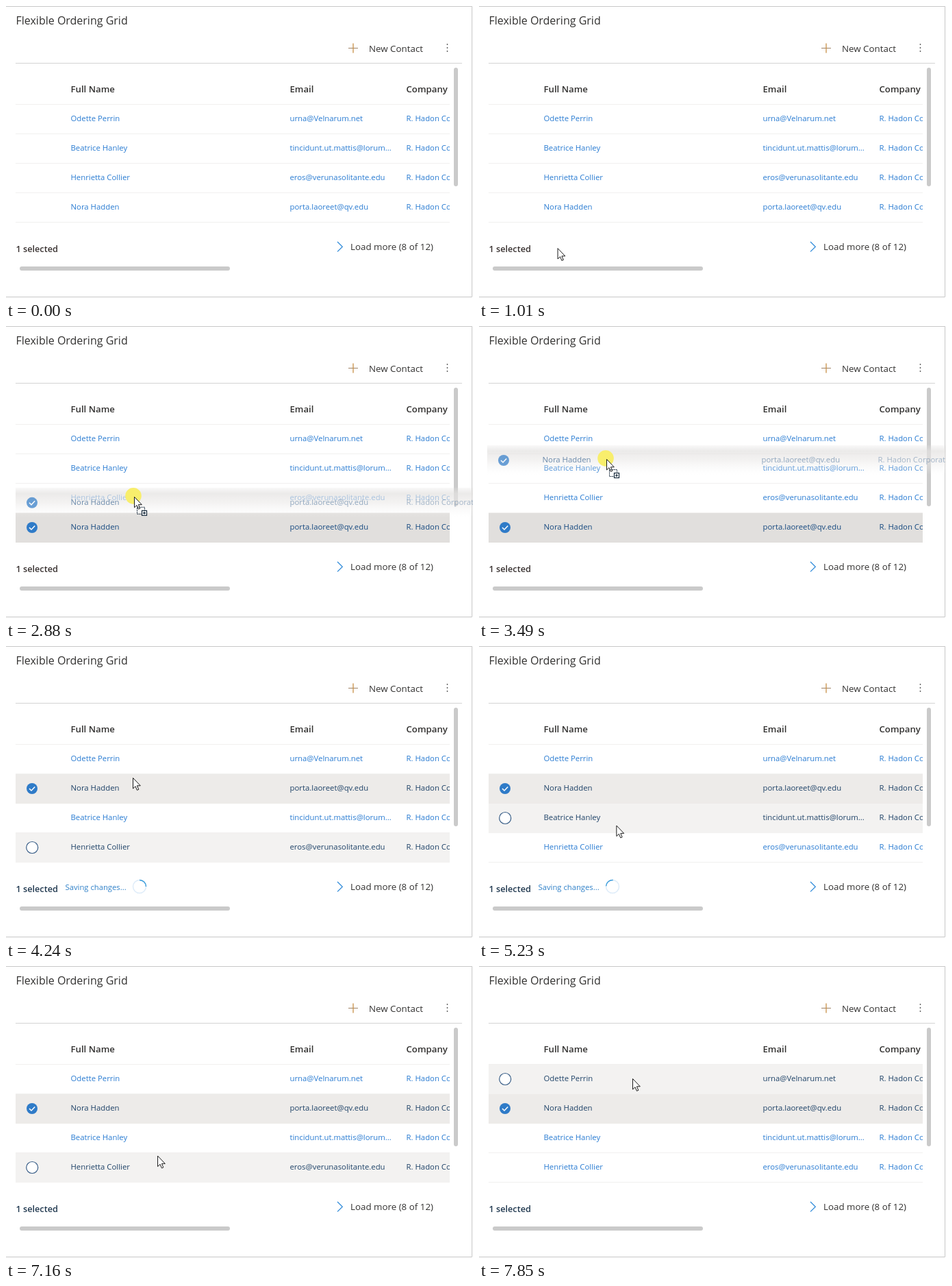
Animation, 682 px wide and 426 px high, one loop 8000 ms. Source, as an HTML page:

```html
<!DOCTYPE html>
<html lang="en">
<head>
<meta charset="utf-8">
<title>Flexible Ordering Grid</title>
<style>
  html, body { margin: 0; width: 100%; height: 100%; overflow: hidden; background: #fff; }
  svg { display: block; width: 682px; height: 426px; font-family: "Open Sans", "Noto Sans", sans-serif; }
  text { white-space: pre; }
  .cell { font-size: 11.35px; }
  .head { font-size: 13.2px; font-weight: 600; fill: #323130; }
  .body { font-size: 13.35px; fill: #323130; }
</style>
</head>
<body>
<svg id="stage" viewBox="0 0 682 426">
  <defs>
    <clipPath id="gridClip"><rect x="14" y="84" width="634" height="240"/></clipPath>
    <linearGradient id="ghostFade" x1="0" y1="0" x2="0" y2="1">
      <stop offset="0" stop-color="#e2e0df" stop-opacity=".2"/>
      <stop offset=".2" stop-color="#e4e2e1" stop-opacity=".72"/>
      <stop offset=".5" stop-color="#ebe9e8" stop-opacity=".6"/>
      <stop offset="1" stop-color="#f6f5f5" stop-opacity="0"/>
    </linearGradient>
  </defs>
  <rect width="682" height="426" fill="#fff"/>
  <path d="M0 .5H680.5V424.5H0" fill="none" stroke="#c8c8c8"/>
  <text x="14.5" y="26.5" font-size="16" fill="#323130">Flexible Ordering Grid</text>
  <path d="M500 61.5H514" stroke="#a08468"/>
  <path d="M507 54.5V68.5" stroke="#c88f45" stroke-width="1.3"/>
  <text class="body" x="530" y="66.5">New Contact</text>
  <g fill="#555">
    <circle cx="644.5" cy="56" r=".9"/><circle cx="644.5" cy="61" r=".9"/><circle cx="644.5" cy="66" r=".9"/>
  </g>
  <path d="M14 83.5H666" stroke="#d4d4d4"/>
  <g class="head">
    <text x="94.5" y="126">Full Name</text>
    <text x="414.5" y="126">Email</text>
    <text x="584.5" y="126">Company</text>
  </g>
  <path d="M14 143.5H648" stroke="#f1f0ef"/>
  <g id="rows" clip-path="url(#gridClip)"></g>
  <g fill="#cacaca">
    <rect x="654" y="90" width="6" height="173" rx="3"/>
    <rect x="20" y="380" width="307" height="6" rx="3"/>
  </g>
  <text id="count" x="14.5" y="359" font-size="12.7" font-weight="600">1 selected</text>
  <g id="saving">
    <text x="86.5" y="356" font-size="11.25" fill="#2f80c8">Saving changes...</text>
    <g fill="none" stroke-width="1.5">
      <circle cx="195" cy="351" r="9.5" stroke="#deecf9"/>
      <path id="arc" d="M195 341.5A9.5 9.5 0 0 1 204.5 351" stroke="#3c9ddb"/>
    </g>
  </g>
  <path d="M484 344L491.3 351.2L484 358.4" fill="none" stroke="#2b88d8" stroke-width="1.2"/>
  <text class="body" x="503" y="356">Load more (8 of 12)</text>
  <g id="ghost"></g>
  <g id="cursor">
    <circle id="press" cx="-1" cy="-1" r="11.8" fill="#f8ee6c"/>
    <path id="arrow" d="M.5 .5V16L4 12.7L6.4 18.3L8.8 17.3L6.4 11.8H11.3Z" fill="#fff" stroke="#1a1a1a"/>
    <g id="dragMark" fill="none" stroke="#16283a">
      <rect x="4.5" y="15.5" width="11" height="10" stroke-dasharray="2 1"/>
      <rect x="11.5" y="20.5" width="7" height="7" fill="#fff" stroke-width="1.2"/>
      <path d="M13 24H17M15 22V26" stroke-width="1.2"/>
    </g>
    <path id="hand" fill="#fff" stroke="#1a1a1a" stroke-linejoin="round"
      d="M3.7 15V2.2Q3.7.6 5.1.6T6.5 2.2V8.4Q8.9 7.4 9 9.4Q11 8.6 11.1 10.4Q13 9.8 13 12V17Q13 19.3 11.4 21V23.4H4.6V21.4L1.2 16.6Q-.2 14 .9 13.2Q2 12.6 3.7 15Z"/>
  </g>
</svg>
<script>
const LOOP = 8000, ROW_H = 43, TOP = 143;
const PRESS = 2380, DRAG = 2590, RELEASE = 3820, REORDER = 3890, MOVE_ON = 4660, SAVED = 5600;
const COLUMNS = [94.5, 414.5, 584.5];
const LINK = '#2a7cd2', ACTIVE = '#1f4368', PRESSED = '#174a80';
const COMPANY = 'R. Hadon Corporation';
const CONTACTS = [
  ['Odette Perrin', 'urna@Velnarum.net'],
  ['Beatrice Hanley', 'tincidunt.ut.mattis@lorum...'],
  ['Henrietta Collier', 'eros@verunasolitante.edu'],
  ['Nora Hadden', 'porta.laoreet@qv.edu'],
];
const DRAGGED = 3;

// Each key: time, x, y
const POINTER = [
  [590, 118, 424], [900, 116, 376], [1200, 112, 314], [1370, 111, 290], [1440, 117, 290],
  [1600, 117, 290], [1840, 152, 290], [2180, 185, 290], [2450, 185, 290], [2590, 186, 284],
  [2880, 187, 249], [3150, 187, 208], [3490, 186, 194], [3820, 186, 194], [3890, 185, 192],
  [4660, 185, 192], [5440, 206, 287], [6070, 218, 349], [6740, 218, 349], [6870, 219, 345],
  [7580, 224, 178], [7850, 224, 164],
];
const GHOST = [[2590, 0, -4], [2880, 0, -36], [3150, -2, -78], [3490, -2, -98]];

const $ = id => document.getElementById(id);
const show = (el, on) => el.setAttribute('display', on ? 'inline' : 'none');
const place = (el, x, y) => el.setAttribute('transform', `translate(${x.toFixed(2)} ${y.toFixed(2)})`);

function add(parent, tag, attrs, text) {
  const el = document.createElementNS('http://www.w3.org/2000/svg', tag);
  for (const key in attrs) el.setAttribute(key, attrs[key]);
  if (text) el.textContent = text;
  return parent.appendChild(el);
}

function at(keys, t) {
  const next = keys.findIndex(key => key[0] > t);
  if (next === 0) return keys[0].slice(1);
  if (next < 0) return keys[keys.length - 1].slice(1);
  const [a, b] = [keys[next - 1], keys[next]];
  const p = (t - a[0]) / (b[0] - a[0]);
  return [a[1] + (b[1] - a[1]) * p, a[2] + (b[2] - a[2]) * p];
}

function addCheck(parent, opacity) {
  const g = add(parent, 'g', { opacity });
  add(g, 'circle', { cx: 38, cy: 22, r: 8, fill: '#2f7bc8' });
  add(g, 'path', { d: 'M34 22L37 25L42.2 19.4', fill: 'none', stroke: '#fff', 'stroke-width': 1.5 });
  return g;
}

function addCells(parent, contact, opacities) {
  return [...contact, COMPANY].map((text, i) =>
    add(parent, 'text', { class: 'cell', x: COLUMNS[i], y: 25, opacity: opacities[i] }, text));
}

const rows = CONTACTS.map(contact => {
  const group = add($('rows'), 'g');
  add(group, 'path', { d: 'M14 43.5H648', stroke: '#f1f0ef' });
  const back = add(group, 'rect', { x: 14, y: 1, width: 634, height: ROW_H });
  const ring = add(group, 'circle', { cx: 38.2, cy: 22, r: 8.5, fill: '#fff', stroke: '#3a5f88', 'stroke-width': 1.2 });
  const check = addCheck(group, 1);
  const cells = addCells(group, contact, [1, 1, 1]);
  return { group, back, ring, check, cells };
});

const ghost = $('ghost');
add(ghost, 'rect', { x: 14, y: 0, width: 680, height: ROW_H, fill: 'url(#ghostFade)' });
addCheck(ghost, .7);
addCells(ghost, CONTACTS[DRAGGED], [.62, .45, .36]).forEach(cell => cell.setAttribute('fill', PRESSED));

function hoveredSlot(t, y) {
  if (t < 590) return -1;
  if (t >= PRESS && t < MOVE_ON) return DRAGGED;
  return Math.floor((y - TOP) / ROW_H);
}

function render(t) {
  const [x, y] = at(POINTER, t);
  const order = t < REORDER ? [0, 1, 2, 3] : [0, 3, 1, 2];
  const hovered = hoveredSlot(t, y);
  const pressing = t >= PRESS && t < RELEASE;
  const dragging = t >= DRAG && t < RELEASE;
  const overLink = t >= 590 && t < PRESS && y < 302 && x + 5 < 165;

  order.forEach((id, slot) => {
    const row = rows[id];
    const selected = id === DRAGGED && t >= PRESS;
    const hover = slot === hovered;
    const fill = selected ? (hover ? '#e1dfdd' : '#edebe9') : hover ? '#f3f2f1' : 'none';
    const ink = selected && hover ? PRESSED : selected || hover ? ACTIVE : LINK;
    place(row.group, 0, TOP + slot * ROW_H);
    row.back.setAttribute('fill', fill);
    row.cells.forEach(cell => cell.setAttribute('fill', ink));
    row.cells[0].setAttribute('text-decoration', hover && overLink ? 'underline' : 'none');
    show(row.ring, hover && !selected);
    show(row.check, selected);
  });

  show(ghost, dragging);
  const [gx, gy] = at(GHOST, t);
  place(ghost, gx, TOP + DRAGGED * ROW_H + gy);

  $('count').setAttribute('fill', t < REORDER ? '#383130' : '#20384f');
  show($('saving'), t >= REORDER && t < SAVED);
  $('arc').setAttribute('transform', `rotate(${(t - 4240) / 1300 * 360} 195 351)`);

  show($('cursor'), t >= 590);
  place($('cursor'), x, y);
  show($('press'), pressing);
  show($('dragMark'), dragging);
  show($('arrow'), !overLink);
  show($('hand'), overLink);
}

const start = performance.now();
function frame() {
  render((performance.now() - start) % LOOP);
  requestAnimationFrame(frame);
}
frame();
</script>
</body>
</html>
```
